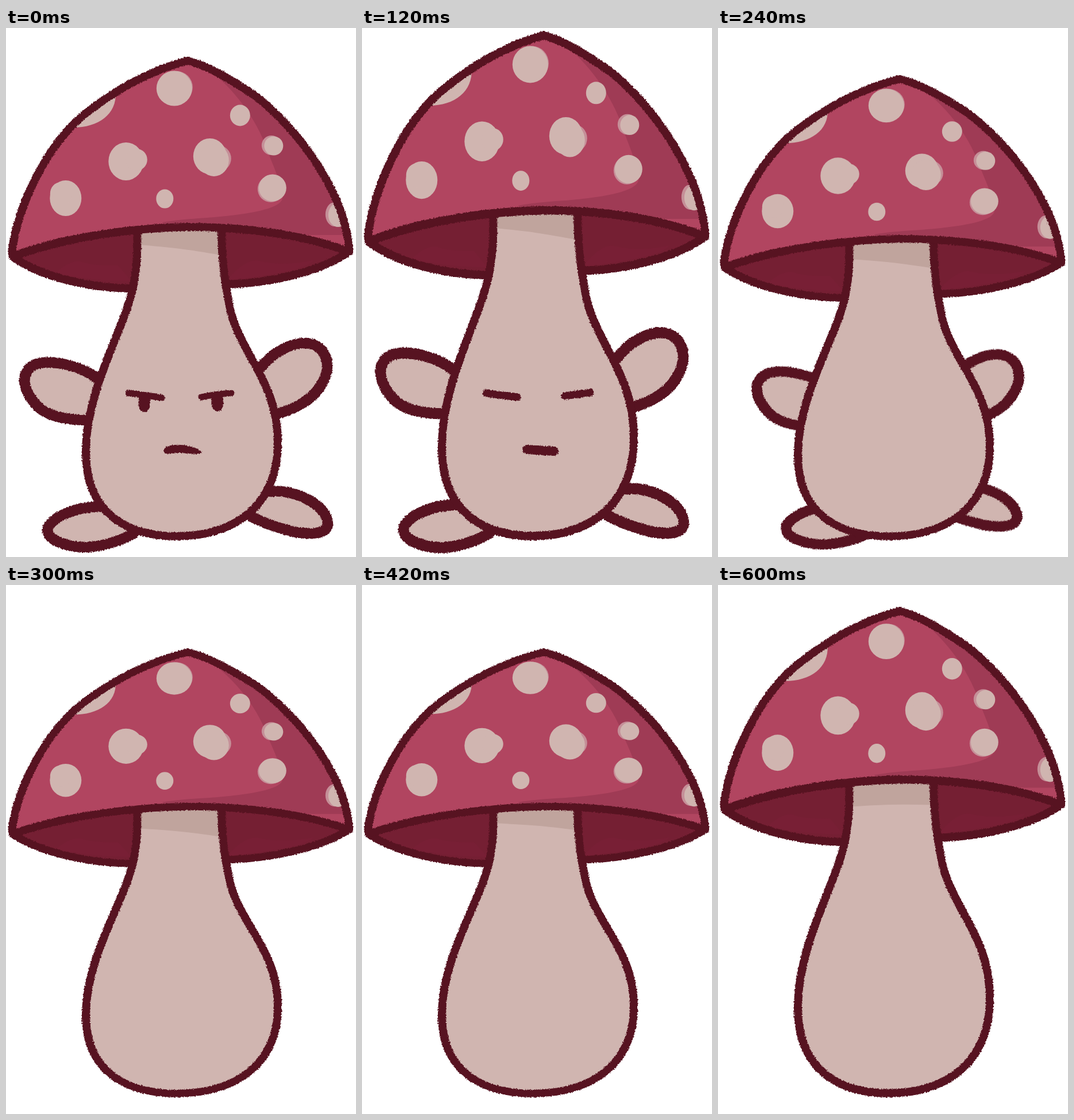
An HTML page that plays this animation: 609x920 px, repeating every 0.66 s.

```html
<!DOCTYPE html>
<html lang="en">
<head>
<meta charset="utf-8">
<title>Bouncing mushroom</title>
<style>
html, body { margin: 0; width: 100%; height: 100%; overflow: hidden; background: #fff; }

svg {
  display: block;
  width: 609px;
  height: 920px;
  /* --y: height, --pull: how far the limbs slide in, --limbs: limb visibility,
     --a/--b/--c: faces, --shift/--tilt: shadow under the cap, --drift: spots */
  --ink: #571321;
  --skin: #d0b5b0;
  animation: bounce 660ms step-end infinite;
}

@keyframes bounce {
  0%      { --y: 1;     --pull: 0;   --limbs: 1; --a: 1; --b: 0; --c: 0; --shift: 0px;  --tilt: 7.2deg;  --drift: 0px; }
  9.0909% { --y: 1.028; --pull: -.3; --limbs: 1; --a: 1; --b: 0; --c: 0; --shift: 0px;  --tilt: 7.2deg;  --drift: 0px; }
  18.181% { --y: 1.053; --pull: 0;   --limbs: 1; --a: 0; --b: 1; --c: 0; --shift: -1px; --tilt: 7.6deg;  --drift: 0px; }
  27.272% { --y: .993;  --pull: 1;   --limbs: 1; --a: 0; --b: 0; --c: 1; --shift: -2px; --tilt: 6.9deg;  --drift: -2px; }
  36.363% { --y: .962;  --pull: 2.2; --limbs: 1; --a: 0; --b: 0; --c: 0; --shift: 5px;  --tilt: 6.5deg;  --drift: 0px; }
  45.454% { --y: .928;  --pull: 0;   --limbs: 0; --a: 0; --b: 0; --c: 0; --shift: 9px;  --tilt: 6.2deg;  --drift: 1px; }
  54.545% { --y: .849;  --pull: 0;   --limbs: 0; --a: 0; --b: 0; --c: 0; --shift: 7px;  --tilt: 4.7deg;  --drift: 1px; }
  63.636% { --y: .928;  --pull: 0;   --limbs: 0; --a: 0; --b: 0; --c: 0; --shift: -2px; --tilt: 5.2deg;  --drift: 0px; }
  72.727% { --y: .971;  --pull: 0;   --limbs: 0; --a: 0; --b: 0; --c: 0; --shift: 1px;  --tilt: 3deg;    --drift: 2px; }
  81.818%, 100% { --y: 1.014; --pull: 0; --limbs: 0; --a: 0; --b: 0; --c: 0; --shift: 5px; --tilt: -1.2deg; --drift: 4px; }
}

.body { transform: scaleY(var(--y)); transform-origin: 0 890px; }
.line { fill: none; stroke: var(--ink); stroke-width: 14; stroke-linecap: round; stroke-linejoin: round; filter: url(#rough); }
.limbs { opacity: var(--limbs); filter: url(#rough); }
.limbs path {
  fill: var(--skin);
  stroke: var(--ink);
  stroke-width: 18.5;
  stroke-linecap: round;
  transform: translate(calc(var(--dx) * var(--pull)), calc(var(--dy) * var(--pull)));
}
.skin, .spots { fill: var(--skin); }
.dots { transform: translate(-1.2px, var(--drift)); }
.halo { fill: #c58f98; }
.under { fill: #751f33; }
.glow { fill: #781f35; }
.shadow {
  fill: #c0a49d;
  transform: translateY(var(--shift)) skewY(var(--tilt));
  transform-origin: 303px 386px;
}
.face { fill: none; stroke: var(--ink); stroke-linecap: round; filter: url(#rough); }
.face .dot { fill: var(--ink); stroke: none; }
</style>
</head>
<body>
<svg viewBox="0 0 609 920" xmlns="http://www.w3.org/2000/svg">
  <defs>
    <filter id="rough" filterUnits="userSpaceOnUse" x="-10" y="-60" width="630" height="990" color-interpolation-filters="sRGB">
      <feTurbulence type="fractalNoise" baseFrequency=".42" numOctaves="2" seed="4"/>
      <feDisplacementMap in="SourceGraphic" scale="4.5" xChannelSelector="R" yChannelSelector="G"/>
    </filter>
    <path id="cap" d="M10 389C21 308 69 208 133 153C184 111 250 74 315 57C349 64 390 89 428 114C494 162 585 270 597 382V389C505 355 400 346 316 346C200 348 90 368 12 397Z"/>
    <path id="stem" d="M228 350C230 400 226 445 211 486C190 550 140 640 139 735C138 840 205 884 300 884C400 882 473 830 473 720C473 610 400 560 388 478C380 440 375 400 375 350"/>
    <path id="under" d="M12 398C60 432 140 452 222 453L388 446C470 442 550 422 597 389C505 355 400 346 316 346C200 348 90 368 12 398Z"/>
    <clipPath id="inCap"><use href="#cap"/></clipPath>
  </defs>

  <g class="body">
    <g class="limbs">
      <path style="--dx:16px;--dy:2px" d="M160 611C135 589 80 575 51 585C16 601 36 643 61 663C80 677 110 682 145 682"/>
      <path style="--dx:-16px;--dy:3px" d="M441 593C467 560 500 547 523 548C557 551 568 586 551 616C536 646 505 661 472 671"/>
      <path style="--dx:21px;--dy:-2px" d="M165 832C120 833 85 849 73 868C66 892 110 903 140 903C175 901 205 889 222 879"/>
      <path style="--dx:-18px;--dy:-6px" d="M458 806C500 802 546 824 558 852C569 882 530 881 505 877C475 870 445 860 424 848"/>
    </g>

    <use class="under" href="#under"/>
    <path class="glow" d="M88 425Q110 404 130 406Q150 414 195 413L218 440Q140 440 88 425Z"/>
    <path class="glow" d="M390 432Q420 400 440 405Q480 415 535 404Q520 424 390 438Z"/>
    <use class="line" href="#under"/>

    <use class="skin" href="#stem"/>
    <path class="shadow" d="M231 320H373V386Q330 384 303 384T231 386Z"/>
    <use class="line" href="#stem"/>

    <use href="#cap" fill="#b14560"/>
    <g clip-path="url(#inCap)">
      <path fill="#9f3b55" d="M335 60C385 92 428 145 450 200C462 235 480 268 481 296C478 318 400 326 350 330Q300 333 272 338L290 360H620V60Z"/>
      <g class="dots">
        <g class="halo">
          <circle cx="298" cy="103" r="28"/>
          <circle cx="463" cy="204" r="17"/>
          <circle cx="462" cy="280" r="23"/>
          <circle cx="370" cy="227" r="23"/>
          <ellipse cx="573" cy="324" rx="16" ry="21"/>
        </g>
        <g class="spots">
          <ellipse cx="294" cy="105" rx="31" ry="30.500"/>
          <path d="M192 112C194 150 162 173 118 173L112 150L170 100Z"/>
          <ellipse cx="408.500" cy="152" rx="17.500" ry="18.500"/>
          <circle cx="467" cy="205" r="16.500"/>
          <ellipse cx="465" cy="278" rx="24" ry="23.500"/>
          <ellipse cx="579" cy="325" rx="17" ry="21"/>
          <ellipse cx="210" cy="232" rx="30.500" ry="33"/>
          <circle cx="228" cy="229" r="19"/>
          <ellipse cx="356" cy="223" rx="29" ry="31"/>
          <ellipse cx="363" cy="230" rx="26" ry="28"/>
          <ellipse cx="277.500" cy="297" rx="15" ry="16.500"/>
          <ellipse cx="105" cy="296" rx="27.500" ry="31"/>
          <ellipse cx="97" cy="288" rx="19" ry="20"/>
        </g>
      </g>
    </g>
    <use class="line" href="#cap" stroke-width="15"/>
  </g>

  <g class="face" style="opacity:var(--a)" stroke-width="11">
    <path d="M213 635Q240 638 271 643M340 642Q362 637 392 635"/>
    <path class="dot" d="M232 640H250Q254 667 240 668Q226 665 232 640ZM359 638H377Q382 666 368 667Q353 664 359 638Z"/>
    <path class="dot" d="M274 735C276 720 325 722 341 738C338 744 310 738 298 739C284 741 274 742 274 735Z"/>
  </g>
  <g class="face" style="opacity:var(--b)" stroke-width="13">
    <path d="M216 635L270 642M353 640L397 634"/>
    <path stroke-width="16" d="M287 733L334 736"/>
  </g>
  <g class="face" style="opacity:var(--c)" stroke-width="8">
    <path d="M237 653L276 657M338 656L371 650"/>
    <path class="dot" d="M294 724Q312 715 328 723Q326 729 294 724Z"/>
  </g>
</svg>
</body>
</html>
```
